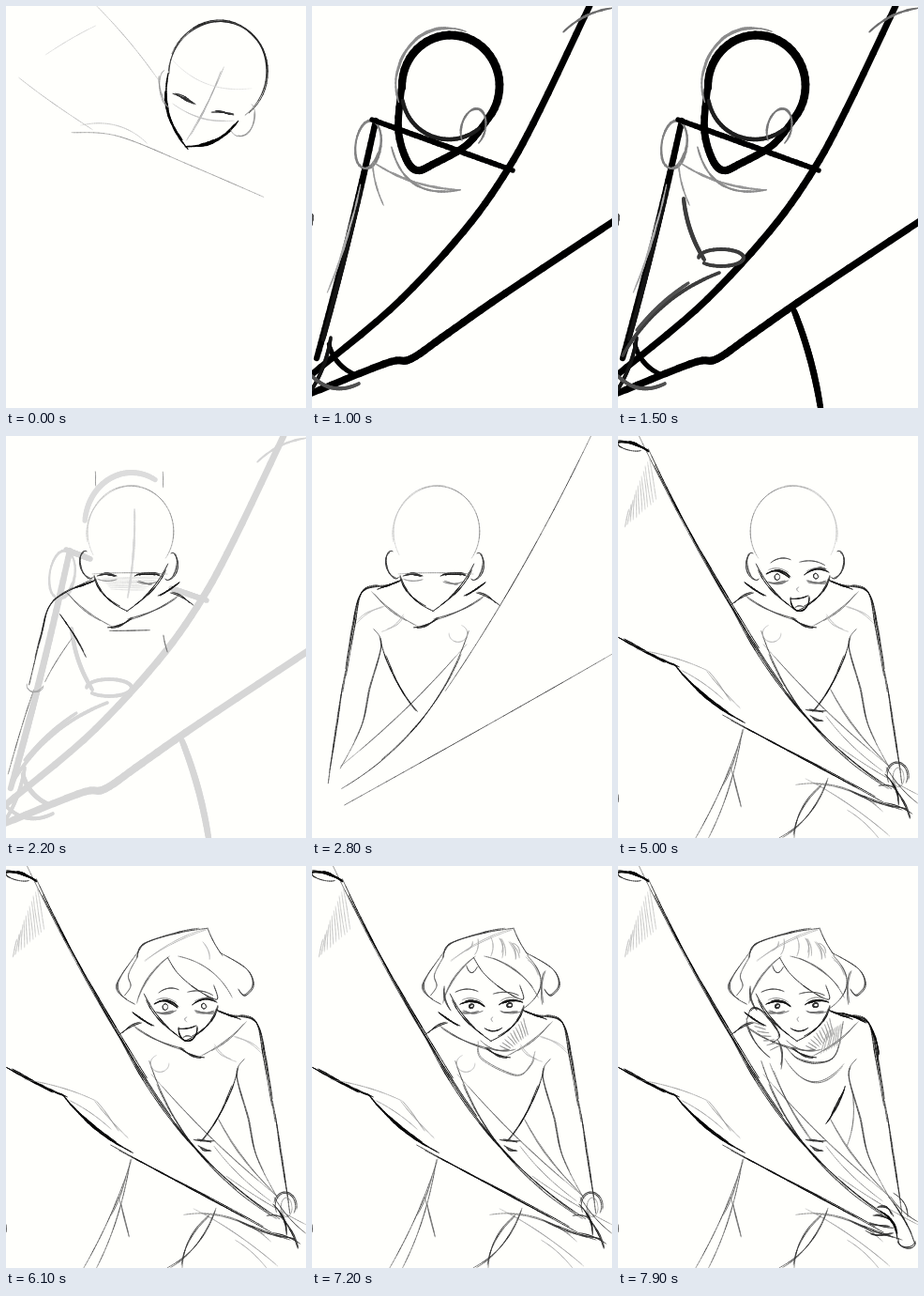
Recreate the animation shown at these times as an HTML page with a canvas. Size 320 px wide and 428 px high, loop 8 s.

```html
<!DOCTYPE html>
<html lang="en">
<head>
<meta charset="utf-8">
<title>Sketch in progress</title>
<style>
html, body { margin: 0; width: 100%; height: 100%; overflow: hidden; background: #fffffc; }
canvas { display: block; width: 320px; height: 428px; }
</style>
</head>
<body>
<canvas id="stage"></canvas>
<script>
const W = 320, H = 428, LOOP = 8000, STEP = 100, FLIP = 2900, FADE = 1600;
const PAPER = '#fffffc', BLACK = 5, DARK = 40, MID = 95, SOFT = 140, PALE = 185;
const canvas = document.getElementById('stage');
const dpr = window.devicePixelRatio || 1;
canvas.width = W * dpr;
canvas.height = H * dpr;
const ctx = canvas.getContext('2d');
ctx.lineCap = ctx.lineJoin = 'round';

const rad = a => a * Math.PI / 180;
const mix = (a, b, u) => a + (b - a) * u;
const parts = [];
let cur, seed = 1;

function rand() {
  seed = (seed * 16807) % 2147483647;
  return seed / 2147483647;
}

// Strokes of a part appear one by one from `on` to `full`, and vanish at `off`.
function part(on, full, off, opt = {}) {
  cur = { on, full, off, ...opt, strokes: [] };
  parts.push(cur);
}

// Samples a curve n times over, each pass slightly off as by hand.
function trace(w, tone, n, at) {
  const loose = w > 3 ? 0 : 1;
  for (let k = 0; k < n; k++) {
    const a = rand() * 7, b = rand() * 7, spread = k ? 1.2 : 0.35;
    const from = k ? rand() * 0.25 : 0, to = k ? 1 - rand() * 0.25 : 1;
    const line = [];
    for (let i = 0; i <= 32; i++) {
      const [x, y] = at(mix(from, to, i / 32));
      line.push([x + loose * spread * Math.sin(a + i / 9), y + loose * spread * Math.sin(b + i / 11)]);
    }
    cur.strokes.push({ w, tone, line, phase: a });
  }
}

// Line that bulges by `bend` to the right hand of its direction
function bow(w, tone, x1, y1, x2, y2, bend = 0, n = 1) {
  const len = Math.hypot(x2 - x1, y2 - y1);
  const nx = (y1 - y2) / len, ny = (x2 - x1) / len;
  trace(w, tone, n, u => {
    const b = bend * 4 * u * (1 - u);
    return [mix(x1, x2, u) + nx * b, mix(y1, y2, u) + ny * b];
  });
}

function oval(w, tone, cx, cy, rx, ry, from = 0, to = 360, tilt = 0, n = 1) {
  const c = Math.cos(rad(tilt)), s = Math.sin(rad(tilt));
  trace(w, tone, n, u => {
    const a = rad(mix(from, to, u)), x = rx * Math.cos(a), y = ry * Math.sin(a);
    return [cx + x * c - y * s, cy + x * s + y * c];
  });
}

// Smooth curve through a few key points
function curve(w, tone, p, n = 1) {
  const m = p.length / 2 - 1;
  const key = (i, k) => p[2 * Math.max(0, Math.min(m, i)) + k];
  trace(w, tone, n, u => {
    const i = Math.min(m - 1, Math.floor(u * m)), v = u * m - i;
    return [0, 1].map(k => {
      const a = key(i - 1, k), b = key(i, k), c = key(i + 1, k), d = key(i + 2, k);
      return b + v * ((c - a) + v * ((2 * a - 5 * b + 4 * c - d) + v * (3 * b - a - 3 * c + d))) / 2;
    });
  });
}

// Rungs between the lines a and b, each given by its two ends
function hatch(n, tone, a, b) {
  for (let i = 0; i < n; i++) {
    const u = i / (n - 1), [x1, y1, x2, y2] = [a, b].flatMap(s => [mix(s[0], s[2], u), mix(s[1], s[3], u)]);
    bow(0.7, tone, x1, y1, x2, y2);
  }
}

function eye(x, y, side, open) {
  bow(1.9, 25, x - 13, y - side, x + 13, y + 2 * side, -4 - open, 2);
  bow(0.8, SOFT, x - 11, y - 4 - side, x + 11, y - 4 + side, -3);
  oval(open ? 1.1 : 2, 50, x - 1, y + 1 + open, 2.5, 2 + open);
  bow(1, 110, x - 11, y + 7, x + 11, y + 7 - side, 2, 3);
}

function face(open) {
  eye(171, 148, 1, open);
  eye(212, 147, -1, open);
  bow(1.1, 70, 153 + 10 * open, 134 + open, 177 + 7 * open, 134 - 2 * open, -3);
  bow(1.1, 80, 193, 136 - 2 * open, 221, 138, -3);
  bow(0.8, PALE, 193, 161, 193, 166, 2);
  bow(1.5, DARK, 184, 173, 203, 172 - 2 * open, 3 - 2 * open);
  if (open) {
    oval(1.7, BLACK, 194, 173, 10, 13, -10, 185);
    bow(1, MID, 188, 184, 199, 183, -3);
  }
}

function paint(s, tone) {
  ctx.strokeStyle = `rgb(${tone},${tone},${tone})`;
  const m = s.line.length - 1;
  for (let i = 0; i < m; i++) {
    const press = 0.5 + 0.5 * Math.sqrt(Math.sin(Math.PI * (i + 0.5) / m));
    const grain = 0.8 + 0.2 * Math.sin(s.phase + i * 0.9) * Math.sin(s.phase * 3 + i * 0.4);
    ctx.lineWidth = s.w * (s.w > 3 ? 0.75 + 0.25 * press : press * grain);
    ctx.beginPath();
    ctx.moveTo(...s.line[i]);
    ctx.lineTo(...s.line[i + 1]);
    ctx.stroke();
  }
}

function draw(t) {
  ctx.setTransform(dpr, 0, 0, dpr, 0, 0);
  ctx.fillStyle = PAPER;
  ctx.fillRect(0, 0, W, H);
  for (const p of parts) {
    if (t < p.on || t >= p.off) continue;
    const share = Math.min(1, (t - p.on + STEP) / (p.full - p.on + STEP));
    const flipped = p.mirror && t < FLIP;
    ctx.setTransform(flipped ? -dpr : dpr, 0, 0, dpr, flipped ? W * dpr : 0, 0);
    for (const s of p.strokes.slice(0, Math.ceil(share * p.strokes.length))) {
      paint(s, p.fades && t >= FADE ? 214 : s.tone);
    }
  }
}

// First idea: tilted head
part(0, 0, 400);
bow(0.8, 165, 97, 0, 162, 78, -2);
bow(0.8, 205, 96, 21, 42, 52, 1);
bow(0.8, 170, 14, 76, 92, 132, 1);
curve(0.9, 130, [70, 135, 120, 139, 200, 171, 275, 203]);
bow(0.8, PALE, 80, 127, 150, 146, -10);
oval(1.4, DARK, 226, 71, 52, 56, 165, 400, 15, 3);
bow(2.6, BLACK, 173, 72, 194, 152, 10, 2);
bow(2.4, BLACK, 191, 150, 248, 122, 8, 3);
oval(0.9, SOFT, 172, 88, 8, 20, 95, 265, -8, 2);
oval(0.9, SOFT, 252, 120, 13, 19, -70, 130, 20, 2);
bow(1.1, 170, 232, 65, 193, 143, -2, 2);
bow(0.8, 215, 178, 58, 262, 88, 11);
bow(0.9, 195, 178, 104, 243, 122, 6, 2);
bow(1.3, 50, 178, 93, 202, 105, -1, 4);
bow(1.3, 50, 219, 113, 243, 115, -1, 4);

part(100, 300, 400);
bow(1, MID, 168, 142, 108, 190, -14);
bow(1, MID, 238, 142, 278, 230, -12);
bow(0.9, 130, 120, 170, 240, 330, 6);

// Bold gesture
part(400, 900, 2700, { fades: true });
curve(7.5, 0, [296, 0, 240, 117, 205, 180, 160, 242, 88, 319, 0, 392]);
curve(8, 0, [322, 229, 200, 310, 140, 352, 105, 376, 80, 380, 0, 412]);
bow(7, 0, 68, 122, 5, 375, -2);
bow(5, 20, 52, 195, 12, 355, -1);
bow(5, 0, 18, 360, 45, 392, 5);
bow(4, 20, 0, 408, 20, 353, 3);
bow(4, 80, 0, 394, 50, 402, 9);
bow(3, 110, 268, 28, 320, 2, -5);
oval(2.5, 130, 60, 147, 13, 26, 0, 480, 8, 2);

part(500, 1000, 1700, { fades: true });
oval(9, 0, 148, 85, 52, 54, 178, 400);
curve(8, 0, [188, 120, 165, 148, 130, 168, 112, 175, 100, 162, 92, 130, 96, 83]);
oval(4.5, 30, 146, 92, 50, 50, 50, 170);
bow(6, 0, 64, 121, 214, 175);
oval(3, SOFT, 145, 82, 56, 58, 160, 290, 0, 2);
oval(3, 120, 172, 130, 13, 21, 130, 400, 15);
bow(3, 150, 65, 166, 158, 196, 7);
bow(3, SOFT, 85, 150, 158, 196, 20);
bow(2, 150, 65, 168, 76, 212, 2);
bow(2.5, 170, 52, 190, 16, 305, -3, 2);
bow(3, 80, 0, 222, 0, 233);

part(1100, 1500, 2700, { fades: true });
bow(7, 0, 188, 325, 216, 428, -3);
bow(4.5, 60, 70, 205, 92, 270, 4);
oval(4, 60, 110, 268, 24, 9, 180, 500);
bow(4, 60, 5, 372, 108, 284, -12);
bow(3.5, 80, 20, 345, 75, 295, -3);

part(1700, 1700, 2700);
bow(6, 214, 64, 121, 90, 131);
bow(6, 214, 176, 162, 214, 175);
oval(6, 220, 134, 95, 50, 56, 185, 300);
bow(3, 215, 137, 78, 130, 172, -2);
hatch(9, 215, [102, 151, 112, 163], [166, 150, 148, 164]);
hatch(2, SOFT, [96, 53, 168, 55], [95, 38, 167, 38]);

// Bald figure
part(1700, 1900, 6100, { mirror: true });
oval(0.9, 120, 187, 102, 46, 49, 145, 290);
oval(0.8, PALE, 187, 102, 46, 49, 230, 390, 0, 2);
oval(1.2, 60, 145, 139, 7, 15, 70, 290, -12, 2);
oval(1.2, 60, 233, 137, 7, 15, -110, 110, 12, 2);

part(1800, 1900, 8000, { mirror: true });
bow(1.3, 25, 147, 136, 192, 187, 5, 2);
bow(1.3, 25, 190, 187, 226, 148, 6, 2);

part(1900, 2000, 3900, { mirror: true });
bow(1.8, 30, 156, 149, 183, 149, -3, 3);
bow(1.5, 50, 202, 149, 223, 149, -2, 3);
bow(0.9, SOFT, 148, 147, 228, 147, -1);
bow(1, 120, 158, 155, 180, 155, 2, 2);
bow(0.9, SOFT, 202, 153, 222, 152, 2);

part(2000, 2200, 8000, { mirror: true });
bow(1.4, 30, 135, 156, 158, 170, 1, 3);
bow(1.4, 30, 224, 153, 250, 163, 0, 3);
bow(1.1, DARK, 120, 180, 145, 167, -2, 2);
bow(1, 70, 135, 169, 190, 196, 3, 2);
bow(1.4, DARK, 184, 193, 212, 204, 2, 2);
bow(0.9, MID, 206, 203, 256, 166, 3, 2);

part(2000, 2200, 2500);
curve(1.2, 30, [92, 152, 50, 176, 38, 212, 25, 265], 2);
bow(1.2, 30, 58, 190, 85, 235, -1, 2);
bow(0.9, 100, 70, 215, 42, 262, 1);
bow(0.8, 60, 30, 270, 2, 360, 1);
oval(1, 165, 31, 266, 9, 7, 0, 200, 0, 2);
bow(1, 70, 110, 207, 154, 207);
bow(0.9, 110, 168, 212, 172, 230);

part(2400, 2800, 8000, { mirror: true });
curve(1.2, 25, [240, 159, 266, 166, 276, 205, 287, 272], 3);
bow(1.1, DARK, 284, 250, 303, 370, -1, 2);
curve(1, 60, [254, 205, 246, 222, 259, 268, 268, 310, 290, 354], 2);
bow(1.1, DARK, 153, 208, 288, 375, 20, 2);
bow(0.8, MID, 155, 222, 290, 352, 4, 2);
part(2400, 2800, 7500, { mirror: true });
bow(0.8, PALE, 240, 180, 273, 200, -3, 2);
oval(0.8, 170, 164, 210, 10, 9, 0, 250);
bow(0.8, PALE, 222, 190, 246, 208, 3, 2);
bow(1.3, 25, 247, 217, 208, 293, -5, 2);

// Long shape in front
part(2600, 3000, 8000, { mirror: true });
bow(1, DARK, 22, 0, 178, 271, 6);
part(2800, 3000, 4200, { mirror: true });
bow(1, 50, 0, 232, 285, 393, 1);
bow(0.9, 50, 128, 320, 90, 428, 2);
bow(0.9, 50, 210, 366, 171, 428, 2);
part(3000, 3400, 8000);
bow(1.4, 25, 0, 5, 33, 15, -2, 3);
oval(1.2, DARK, 13, 11, 13, 4, 20, 330, 14);
hatch(12, PALE, [12, 78, 33, 22], [7, 97, 41, 68]);
bow(0.8, MID, 0, 380, 0, 390);
bow(0.8, 160, 200, 365, 290, 426, -3, 2);
part(3100, 3500, 7700);
oval(1.1, 60, 298, 362, 11, 14, 150, 390, 0, 2);
oval(0.9, SOFT, 299, 363, 6, 10);
bow(1.3, 25, 285, 360, 299, 393, -4, 2);
bow(1.2, DARK, 293, 372, 311, 407, -2, 2);
bow(1, 60, 278, 372, 298, 378, -3);
bow(1.1, DARK, 284, 391, 314, 402, -2, 2);
bow(1, 60, 286, 353, 320, 391, 2);

part(3700, 4300, 8000);
bow(2.6, BLACK, 0, 6, 33, 17, -3, 2);
bow(1.5, BLACK, 32, 14, 176, 266, 6, 2);
bow(1.3, 20, 122, 184, 292, 376, 18, 2);
bow(1.6, BLACK, 0, 214, 65, 246, 1, 3);
bow(1.9, BLACK, 60, 243, 135, 305, 5, 3);
bow(1.3, 15, 112, 297, 283, 390, 0, 3);
bow(0.8, SOFT, 20, 227, 95, 250, -3);
bow(0.8, SOFT, 95, 250, 130, 290, 1, 2);
bow(0.8, SOFT, 68, 250, 112, 280, -2);
bow(1, 60, 134, 312, 83, 428, -3);
bow(1, 70, 133, 313, 96, 428, -5);
bow(0.8, MID, 120, 352, 131, 395, -1, 2);
bow(0.9, MID, 128, 330, 112, 372, -2);
bow(1, 50, 224, 364, 172, 428, -9, 2);
bow(1, 50, 217, 371, 188, 428, 7, 2);
bow(0.8, MID, 190, 371, 282, 400, -12, 2);
part(4200, 4900, 8000);
bow(1.1, 50, 200, 291, 222, 293, 1, 2);
bow(1.1, 50, 205, 298, 219, 303, 1, 2);
bow(0.9, MID, 226, 268, 291, 354, 4, 2);
bow(0.8, 110, 222, 298, 282, 357, 3);
bow(0.8, 110, 235, 330, 320, 382, 2);
bow(1.1, DARK, 246, 377, 303, 398, 1, 2);
bow(0.8, 150, 244, 398, 278, 428, -2);

part(3900, 4700, 6400);
face(1);

// Hair
part(5500, 6400, 8000);
curve(1.2, 60, [140, 98, 147, 83, 185, 71, 215, 66], 2);
bow(1, 60, 215, 66, 231, 96, 1);
curve(1.1, 60, [228, 92, 256, 109, 263, 126, 254, 137, 248, 131], 2);
curve(1.1, 70, [144, 87, 124, 115, 119, 129, 126, 140, 138, 147], 2);
curve(1, 90, [140, 98, 131, 116, 133, 128, 126, 138]);
bow(1, MID, 174, 96, 140, 146, 6, 2);
curve(1.2, 50, [172, 97, 183, 114, 203, 131, 225, 142, 222, 127]);
bow(1, 90, 184, 96, 241, 140, -9, 2);
bow(1.1, 60, 230, 96, 226, 151, -16);
bow(0.9, MID, 249, 111, 246, 148, 3, 2);
part(6100, 6700, 8000);
bow(0.8, 170, 215, 67, 148, 101, 3, 2);
for (let i = 0; i < 12; i++) {
  const a = rad(mix(195, 345, rand())), x = 190 + 42 * Math.cos(a), y = 112 + 36 * Math.sin(a);
  bow(0.7, 165, x, y, x + 14 * Math.cos(a), y + 10 + rand() * 12, -2);
}
bow(1.1, 80, 165, 106, 176, 107, 7);
bow(1.1, 70, 141, 128, 148, 154, 2, 2);

part(6400, 6700, 8000);
face(0);

part(6800, 7200, 8000);
hatch(10, SOFT, [200, 191, 226, 162], [210, 196, 230, 180]);
bow(1, 90, 180, 186, 217, 195, 6, 2);
part(6900, 7200, 7400);
curve(0.9, 110, [177, 187, 182, 205, 218, 222, 233, 212, 238, 197], 2);

// Sleeve, cheek hand and clasped hands
part(7300, 7700, 8000);
curve(1.2, DARK, [138, 163, 143, 151, 155, 155, 172, 179, 164, 188], 2);
bow(1, 60, 137, 162, 162, 204, 5, 2);
hatch(7, SOFT, [142, 166, 162, 196], [155, 170, 172, 192]);
bow(1, 70, 170, 185, 174, 216, -3, 2);
curve(1.1, 70, [178, 190, 191, 204, 214, 209, 232, 201, 240, 166], 2);
bow(0.9, MID, 178, 205, 241, 211, 22, 2);
hatch(8, 155, [224, 176, 238, 168], [216, 200, 237, 190]);
bow(1.6, 25, 242, 234, 222, 275, -2, 2);
bow(0.9, 80, 162, 210, 208, 294, 3, 2);
bow(0.9, MID, 250, 238, 244, 298, -4);
bow(1.5, BLACK, 232, 156, 268, 168, -2, 2);
bow(1.4, BLACK, 268, 168, 277, 208, -3, 2);
part(7700, 7800, 8000);
for (let i = 0; i < 4; i++) bow(1.1, DARK, 264 + 4 * i, 388 - 8 * i, 294, 391 - 6 * i, 4 - 3 * i, 2);
bow(1.5, BLACK, 280, 368, 298, 398, -5, 2);
bow(1.2, DARK, 289, 352, 316, 402, -3, 2);
bow(1.1, 50, 294, 348, 309, 374, -4);
oval(1, DARK, 308, 399, 9, 7, 0, 200, 0, 2);
bow(1, 60, 291, 352, 320, 379, 3);

let last = -1;
function tick(now) {
  const t = Math.floor((now % LOOP) / STEP) * STEP;
  if (t !== last) draw(last = t);
  requestAnimationFrame(tick);
}
draw(0);
requestAnimationFrame(tick);
</script>
</body>
</html>
```
